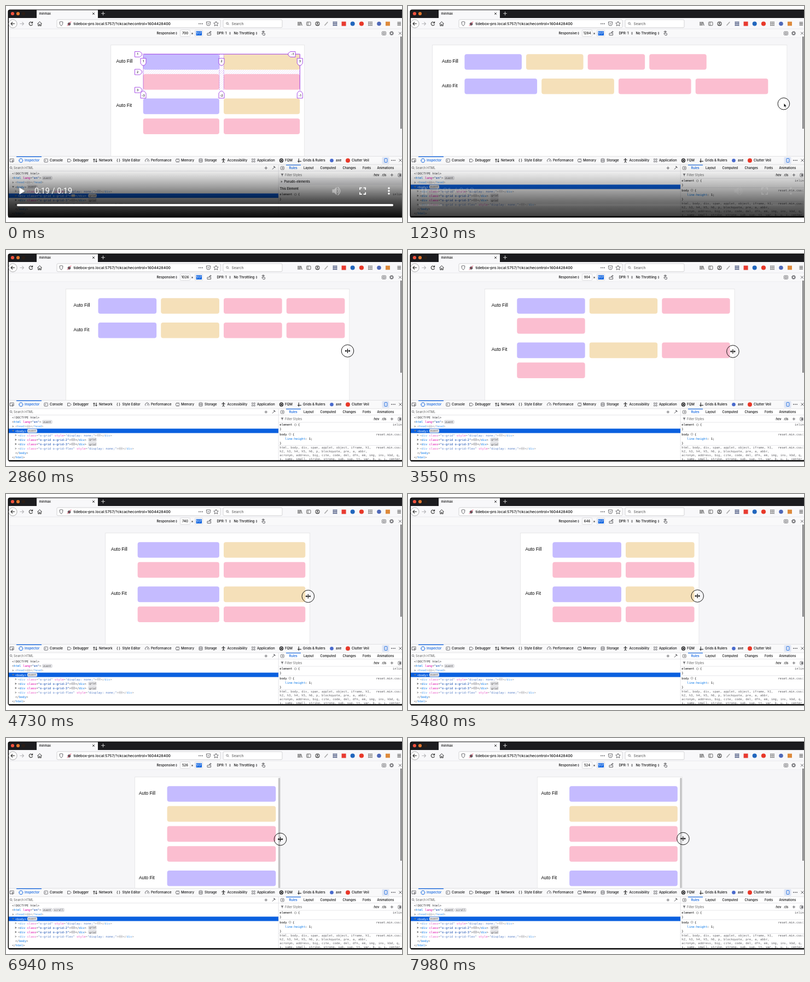
These frames come from a looping animation (724 px wide and 396 px high, 8000 ms). An HTML page:

```html
<!DOCTYPE html>
<html lang="en">
<head>
<meta charset="utf-8">
<title>Auto fill and auto fit</title>
<style>
  html, body { margin: 0; width: 100%; height: 100%; overflow: hidden; background: #fff; }
  svg { display: block; }
  text { font-family: Inter, "Open Sans", sans-serif; font-weight: 500; white-space: pre; }
  .mono { font-family: "DejaVu Sans Mono", monospace; font-weight: 400; }
  .page { font-family: "Liberation Sans", sans-serif; font-weight: 400; }
  .clock { font-family: Roboto, sans-serif; font-weight: 400; }
</style>
</head>
<body>
<svg id="stage" width="724" height="396" viewBox="0 0 724 396"></svg>
<script>
const LOOP = 8000, START = 40;
const INK = '#0c0c0d', GREY = '#57575c', BLUE = '#0a60df', VIOLET = '#9326e0';
const MONO = 5.55, CHAR = MONO * 0.602;

// Drawing helpers; text is centred vertically on y.
const esc = s => s.replace(/&/g, '&amp;').replace(/</g, '&lt;');
const text = (x, y, s, size = 6.05, fill = INK, extra = '') =>
  `<text x="${x}" y="${y + size * 0.36}" font-size="${size}" fill="${fill}" ${extra}>${esc(s)}</text>`;
const mono = (x, y, s, fill = INK, size = MONO) => text(x, y, s, size, fill, 'class="mono"');
const rect = (x, y, w, h, fill, r = 0, extra = '') =>
  `<rect x="${x}" y="${y}" width="${w}" height="${h}" rx="${r}" fill="${fill}" ${extra}/>`;
const box = (x, y, w, h, stroke = GREY, r = 1, fill = 'none') => rect(x, y, w, h, fill, r, `stroke="${stroke}" stroke-width=".8"`);
const dot = (x, y, r, fill, extra = '') => `<circle cx="${x}" cy="${y}" r="${r}" fill="${fill}" ${extra}/>`;
const ring = (x, y, r, stroke = GREY, w = 0.9, extra = '') => dot(x, y, r, 'none', `stroke="${stroke}" stroke-width="${w}" ${extra}`);
const line = (d, stroke = GREY, w = 0.9, extra = '') => `<path d="${d}" fill="none" stroke="${stroke}" stroke-width="${w}" ${extra}/>`;
const shape = (d, fill) => `<path d="${d}" fill="${fill}"/>`;
const cross = (x, y, r = 2.2, stroke = GREY) => line(`M${x - r} ${y - r}l${2 * r} ${2 * r}m0 ${-2 * r}l${-2 * r} ${2 * r}`, stroke);
const plus = (x, y, r = 3, stroke = GREY) => line(`M${x - r} ${y}h${2 * r}M${x} ${y - r}v${2 * r}`, stroke);
const dots = (x, y, fill = GREY) => [-3, 0, 3].map(d => dot(x + d, y, 0.9, fill)).join('');
const updown = (x, y) => shape(`M${x - 1.5} ${y - .6}l1.5 -2.2l1.5 2.2zm0 1.2l1.5 2.2l1.5 -2.2z`, GREY);
const mesh = (x, y, stroke = GREY) => line(`M${x - 4} ${y - 3}h8m-8 3h8m-8 3h8M${x - 3} ${y - 4}v8m3 -8v8m3 -8v8`, stroke, 0.9);
const lens = (x, y) => ring(x, y, 1.8, GREY, 0.7) + line(`M${x + 1.3} ${y + 1.3}l1.8 1.8`, GREY, 0.7);

function browser() {
  return rect(3.5, 6.5, 730, 381, '#050505', 4) + rect(5, 7.5, 719, 15, '#1c1c1f', 3) + rect(5, 22, 719, 363.5, '#f8f8fa')
    // tab strip
    + dot(12, 14, 3.1, '#f4523f') + dot(22, 14, 3.1, '#e2762d') + dot(32, 14, 3.1, '#2a1d16')
    + rect(56, 7.5, 112, 15, '#f8f8fa') + text(60.5, 14.3, 'minmax', 5.7) + cross(160, 14, 1.9, '#222') + plus(177.5, 13.7, 3.4, '#ddd')
    // navigation
    + dot(12.5, 32.5, 7.6, '#fff', 'stroke="#888" stroke-width=".7"')
    + line('M16 32.5h-7m3 -3l-3 3l3 3', '#333', 1.1) + line('M25.5 32.5h7m-3 -3l3 3l-3 3', '#b5b5b8', 1.1)
    + line('M48 30.5a3.2 3.2 0 1 0 .5 3M48.6 28.5v2.6h-2.6', '#333', 1.1)
    + line('M57.5 32.5l4 -3.8l4 3.8M58.8 32v4.3h2v-2.5h1.4v2.5h2v-4.3', '#333', 1)
    + box(93, 25, 299, 14.7, '#c8c8cb', 2, '#fff')
    + line('M98 29.2q2.6 0 3 -1q.4 1 3 1q.3 5.5 -3 7.3q-3.3 -1.8 -3 -7.3z') + dot(115.5, 33, 2.8, '#58585c')
    + line('M112 36.5l7 -8', '#e2385a', 1)
    + text(123.5, 32.5, 'tidebox-pro.local:5757/?ckcachecontrol=1604428400', 6.85) + dots(356, 32.5)
    + line('M366.5 29h7v3.5a3.5 3.5 0 0 1 -7 0zM368.2 31.5l1.8 1.7l1.8 -1.7')
    + line('M384 28.2l1.3 2.8l3 .3l-2.2 2.1l.6 3.1l-2.7 -1.6l-2.7 1.6l.6 -3.1l-2.2 -2.1l3 -.3z')
    + box(397, 25, 108, 14.7, '#c8c8cb', 2, '#fff') + lens(404.5, 31.8) + text(412.5, 32.5, 'Search', 6.5, '#666')
    // extensions
    + line('M534 29v7m2 -7v7m2 -7v7m1.2 -6.7l2 6.7', '#444', 1) + box(549.5, 29.3, 7.5, 6.4, '#444') + line('M552 29.3v6.4', '#444')
    + ring(569.5, 32.5, 3.5, '#444', 1.1) + dot(569.5, 31.6, 1.4, '#444') + line('M567.3 34.6h4.4', '#444', 1)
    + line('M582.5 35.8l5.8 -6.5', '#aaa', 1.7) + mesh(601.5, 32.5, '#334170') + rect(613.6, 28.6, 8, 8, '#e83b31')
    + dot(633.7, 32.5, 4, '#2166bd') + dot(650, 32.5, 4.1, '#e83829') + mesh(666, 32.5, '#777')
    + dot(682, 32.5, 3.8, '#5069b8') + rect(694, 28.7, 8, 7.6, '#dd8a3c')
    + line('M715.5 30h6.5m-6.5 2.5h6.5m-6.5 2.5h6.5', '#333', 1)
    // responsive bar
    + rect(5, 42, 719, 16, '#f9f9fa') + line('M5 42h719M5 58h719', '#dedee1', 0.6)
    + text(275.5, 50, 'Responsive') + updown(311.5, 50) + box(318.5, 44, 18, 11.7, '#d4d4d8', 1, '#fff')
    + text(338.5, 50, '×') + box(345.5, 44, 14, 11.7, '#d4d4d8', 1, '#fff') + rect(347.5, 46, 10.5, 8, BLUE) + text(347.7, 50, '517', 6.05, '#fff')
    + line('M368 50v3.5h6.5v-3.5zM371 48.5h3v-2m-1.5 1.3l1.5 -1.7l1.5 1.7')
    + text(385.5, 50, 'DPR: 1') + updown(409.5, 50) + text(416.5, 50, 'No Throttling') + updown(458, 50)
    + line('M470 53.5l-2.4 -3l1.2 -.6l1 1v-4.4h1.2v3.3l2.6 .8l-.5 2.9zM467.5 47.3q2.8 -3 5.6 0')
    + box(687.5, 47, 7, 6.2) + ring(691, 50.2, 1.6)
    + ring(705, 50, 2.3, GREY, 1.2) + ring(705, 50, 3.6, GREY, 1, 'stroke-dasharray="1.4"')
    + cross(720.5, 50, 2.4)
    + rect(5, 58.3, 719, 217, '#f6f6f8') + rect(721.6, 56, 1.4, 169, '#333');
}

function devtools() {
  const tabs = { Inspector: 34, Console: 80, Debugger: 122.5, Network: 170, 'Style Editor': 212.5, Performance: 265, Memory: 320,
    Storage: 363, Accessibility: 404.5, Application: 459, FQM: 510, 'Grids & Rulers': 543, axe: 603, 'Clutter Veil': 632 };
  const side = { Rules: 517.5, Layout: 544, Computed: 574.5, Changes: 615.5, Fonts: 652, Animations: 678.5 };
  const names = (set, y, size) => Object.entries(set).map(([s, x], i) => text(x, y, s, size, i ? INK : BLUE)).join('');
  return rect(5, 275.5, 719, 110, '#fff') + rect(5, 275.5, 719, 15.5, '#f9f9fa')
    + line('M5 275.5h719M5 291h719', '#d8d8dc', 0.7) + rect(19, 275.7, 46, 1.3, BLUE)
    + names(tabs, 283.2, 6.05)
    + line('M12 285.8h-4.8v-5.5h7v2M11 282.8l4 1.4l-1.9 .7l-.7 1.9z')
    + box(24.3, 280.3, 6, 6, BLUE) + line('M27.3 279v1.3m0 6v1.3m-4.3 -4.3h1.3m6 0h1.3', BLUE)
    + box(69.8, 280.3, 6.6, 6) + line('M71.3 282l1.3 1.3l-1.3 1.3')
    + line('M112.5 280.8h4.3l2.5 2.5l-2.5 2.5h-4.3z')
    + line('M161 286.5v-6m-1.6 1.6l1.6 -1.7l1.6 1.7M165 280v6m-1.6 -1.6l1.6 1.7l1.6 -1.7', INK, 1)
    + text(202, 283, '{ }', 6.2)
    + line('M255 285.5a3.5 3.5 0 1 1 6 0M258 285l1.3 -3') + box(310.5, 281, 6.2, 4.5) + line('M312 279.8v1.2m2 -1.2v1.2m2 -1.2v1.2m-4 4.5v1.2m2 -1.2v1.2m2 -1.2v1.2')
    + box(353, 279.8, 6, 6.8, GREY, 1.5) + line('M353 282h6m-6 2.2h6')
    + dot(397.5, 280.2, 1, INK) + line('M394.3 282h6.4m-3.2 0v2.2l-1.7 3m1.7 -3l1.7 3', INK, 1)
    + [449.3, 453].map(x => box(x, 280, 2.4, 2.4) + box(x, 283.9, 2.4, 2.4)).join('')
    + ring(503.5, 283.2, 3, INK, 1.3) + dot(503.5, 283.2, 1.4, INK) + line('M533 284.7h7m-4.8 -5v7.5', INK, 1)
    + dot(595.5, 283.2, 3.3, '#4869cc') + dot(625, 283.2, 4, '#e83829')
    + rect(687.5, 277, 13, 12.5, '#dfe6f5', 1.5) + box(692, 279.5, 5, 7, BLUE) + dots(708, 283) + cross(721, 283, 2.5)
    // markup search and side tabs
    + line('M5 302.6h719M498.2 291v94.5', '#dcdce0', 0.7)
    + lens(9, 296.3) + text(14, 297, 'Search HTML', 5.55, '#777') + plus(475.3, 297, 2.7) + line('M487 299.5l3.8 -4.2', GREY, 1) + line('M489.5 293.7l2.8 2.8', GREY, 1.5)
    + box(502.3, 294.3, 6, 5.5) + shape('M504 297l2.5 -1.5v3z', GREY) + rect(512, 291, 27, 1.1, BLUE) + names(side, 297, 5.75)
    + shape('M502.5 307.5h5l-2 2.3v2.4l-1 -.7v-1.7z', GREY) + text(510, 309.8, 'Filter Styles', 5.55, '#777')
    + text(671, 309.8, ':hov', 5.55) + text(686, 309.8, '.cls', 5.55) + plus(705.5, 309.8, 2.6) + box(717, 307, 5, 6) + rect(719, 308.5, 3, 3, GREY)
    + line('M498 316h226', '#dcdce0', 0.7);
}

// Markup tree
const rowY = i => 307.2 + i * 8.1;
const badge = (x, y, label, w) => box(x, y - 3, w, 6, '#c9c9cf', 1.4, '#eeeef1') + mono(x + 1.6, y, label, '#333', 4.8);
const fold = (x, y, open) => shape(open ? `M${x - 2} ${y - 1.3}h4l-2 3z` : `M${x - 1.3} ${y - 2}v4l3 -2z`, '#777');
function paint(src, selected) {
  if (selected) return `<tspan fill="#fff">${esc(src)}</tspan>`;
  return src.replace(/("[^"]*")|([a-z]+)(?==)|(<\/?)([a-z]+)|([>=])/g, (m, value, attr, lead, name) =>
    value ? `<tspan fill="#003eaa">${value}</tspan>` : attr ? `<tspan fill="#dd00a9">${attr}</tspan>`
    : name ? `${esc(lead)}<tspan fill="#0074e8">${name}</tspan>` : m);
}
function node(row, x, src, { close, tag, open, chosen, dim } = {}) {
  const y = rowY(row);
  const put = (px, s) => `<text class="mono" x="${px}" y="${y + 2}" font-size="${MONO}" fill="#55555a">${paint(s, chosen)}</text>`;
  let end = x + src.length * CHAR, out = put(x, src);
  if (open !== undefined) out += fold(x - 4, y, open);
  if (close) {
    out += box(end + .7, y - 2, 6.6, 4, '#b5b5bc', 1, '#eeeef1') + [2, 4, 6].map(d => dot(end + d, y, 0.55, '#444')).join('') + put(end + 8, close);
    end += 8 + close.length * CHAR;
  }
  if (tag) out += badge(end + (tag === 'grid' ? 3.8 : 2.2), y, tag, tag.length * 2.9 + 3);
  return `<g opacity="${dim ? 0.65 : 1}">${out}</g>`;
}
function tree(picked) {
  const div = (row, cls, style, tag) => node(row, 22, `<div class="${cls}"${style ? ' style="display: none;"' : ''}>`,
    { close: '</div>', open: false, tag, dim: style, chosen: row === picked });
  return rect(5, rowY(picked) - 4, 493, 8.1, BLUE) + mono(11, rowY(0), '<!DOCTYPE html>', '#38383d')
    + node(1, 11, '<html lang="en">', { tag: 'event' }) + node(2, 17, '<head>', { close: '</head>', open: false, dim: true })
    + node(3, 17, '<body>', { tag: 'event', open: true, chosen: picked === 3 })
    + div(4, 'o-grid', true) + div(5, 'o-grid o-grid-2', false, 'grid') + div(6, 'o-grid o-grid-3', false, 'grid') + div(7, 'o-grid o-grid-flex', true)
    + node(8, 17, '</body>') + node(9, 11, '</html>');
}

// Rules panel
const rule = (y, name) => mono(500.3, y, name) + box(500 + CHAR * (name.length + 1.2), y - 1.7, 3.4, 3.4, '#888') + mono(502 + CHAR * (name.length + 2.6), y, '{');
const elementRules = () => rect(498.6, 316.4, 226, 11.5, '#f3f3f5') + fold(504, 322, false) + text(508.5, 322.2, 'Pseudo-elements', 5.6)
  + text(500.5, 335, 'This Element', 5.6) + rule(345.5, 'element') + mono(707, 345.5, 'inline', GREY) + mono(500.3, 354, '}');
const bodyRules = () => rule(320.5, 'element') + mono(707, 320.5, 'inline', GREY) + mono(500.3, 328.3, '}')
  + rule(337.7, 'body') + mono(676.5, 337.7, 'reset.min.css:2', GREY) + mono(510.3, 346, 'line-height', '#0074e8') + mono(510.3 + 11 * CHAR, 346, ': 1;') + mono(500.3, 354, '}')
  + line('M498 333h226M498 358.4h226', '#dcdce0', 0.7) + mono(676.5, 362.3, 'reset.min.css:2', GREY)
  + ['html, body, div, span, applet, object, iframe, h1,', 'h2, h3, h4, h5, h6, p, blockquote, pre, a, abbr,',
     'acronym, address, big, cite, code, del, dfn, em, img, ins, kbd, q,', 's, samp, small, strike, strong, sub, sup, tt, var, b, u, i, center,']
    .map((s, i) => mono(500.3, 362.3 + i * 6.75, s, '#66666b')).join('');

// Responsive page: two grids of repeat(auto-fill | auto-fit, minmax(200px, 1fr))
const SCALE = 0.5045, CENTRE = 368.7, GAP = 16 * SCALE, ROW = 28.6, TOP = 88.2;
const COLOURS = ['#c5bbff', '#f5e0b9', '#fbbed0', '#fbbed0'];
const rightEdge = w => CENTRE + w * SCALE / 2;
function page(w) {
  const wide = w * SCALE, left = CENTRE - wide / 2, x0 = left + 58.6;
  const room = Math.min(1100 * SCALE, wide - 58.6 - GAP);
  const fill = Math.floor((room + GAP) / (200 * SCALE + GAP)), fit = Math.min(fill, 4);
  const step = ROW + GAP, rows = Math.ceil(4 / fit);
  const grid = (label, cols, top) => {
    const cell = (room + GAP) / cols - GAP;
    return text(left + wide * 0.0265, top + 12.6, label, 8.3, '#000', 'class="page"')
      + COLOURS.map((c, i) => rect(x0 + (i % cols) * (cell + GAP), top + Math.floor(i / cols) * step, cell, ROW, c, 4)).join('');
  };
  return rect(left - .6, 71.2, wide + 1.2, 210, '#dcdcde') + rect(left, 71.8, wide, 210, '#fff')
    + grid('Auto Fill', fill, TOP) + grid('Auto Fit', fit, TOP + rows * step + GAP)
    + (rows > 2 ? rect(left + wide - 3.6, 73, 3.4, 202, '#c3c3c4', 1.5) : '');
}

function gridLines() {
  const xs = [251, 394, 537.3], [t, b] = [88.2, 154];
  const label = (x, y, s, turn) => `<g transform="translate(${x} ${y})"><path transform="rotate(${turn})" d="M-5 -5h10v9l-3.2 4h-3.6l-3.2 -4z" fill="#fff" stroke="${VIOLET}" stroke-width=".8" stroke-linejoin="round"/>${text(0, 0, s, 5.2, INK, 'text-anchor="middle"')}</g>`;
  return rect(251, 117, 286.3, 8, 'url(#hatch)') + rect(390, t, 8.2, b - t, 'url(#hatch)')
    + line(`M251 ${t}H537.3V${b}`, VIOLET, 0.9) + line(`M251 ${t}V${b}`, VIOLET, 0.5)
    + line(`M390 ${t}V${b}M398.2 ${t}V${b}`, VIOLET, 0.5, 'stroke-dasharray="2 1.2"')
    + xs.map((x, i) => label(x, 101, `${i + 1}`, 0) + label(x, 164, `${i - 3}`, 180)).join('')
    + [88.5, 121, 154].map((y, i) => label(240.5, y, `${i + 1}`, -90)).join('') + label(524, 88.5, '-1', 90);
}

function controls(t) {
  const ended = t < START, sec = Math.floor(Math.max(0, t - START) / 1000);
  const done = ended ? 1 : (t - START) / 19000;
  return shape(ended ? 'M24.5 333v12.5l10 -6.2z' : 'M24.5 333.5h3.5v12h-3.5zm6.5 0h3.5v12h-3.5z', '#fff')
    + text(52, 339, `0:${ended ? 19 : '0' + sec} / 0:19`, 14.5, '#fff', 'class="clock"')
    + `<g opacity=".4">${shape('M596.5 336.3h3.5l4.5 -4.5v15l-4.5 -4.5h-3.5z', '#fff')}${line('M606.5 335.5q3 3.7 0 7.4M606.5 332q8.5 7.3 0 14.6', '#fff', 1.6)}</g>`
    + line('M647 337v-3.6h3.6m3 0h3.6v3.6m0 4.4v3.6h-3.6m-3 0h-3.6v-3.6', '#fff', 1.8)
    + [-5, 0, 5].map(d => dot(700, 339 + d, 1.8, '#fff')).join('')
    + rect(20, 363, 688, 4, 'rgba(255,255,255,.3)', 2) + rect(20, 363, 688 * done, 4, '#fff', 2);
}

function cursor(x, y, dragging) {
  return ring(x, y, dragging ? 11.3 : 10.8, '#000', 0.9) + (dragging
    ? line(`M${x - 3.5} ${y}h7M${x} ${y - 4}v8`, '#000', 1.2) + shape(`M${x - 5} ${y}l2.5 -2v4zM${x + 5} ${y}l-2.5 -2v4z`, '#000')
    : `<path d="M${x + .5} ${y - .5}v6.3l1.5 -1.3l1.2 2.3l1 -.5l-1.1 -2.2h1.9z" fill="#000" stroke="#fff" stroke-width=".3"/>`);
}

// Keys are [time, value...] rows.
function track(keys, t, col = 1) {
  const i = keys.findIndex(k => k[0] > t);
  if (i < 0) return keys[keys.length - 1][col];
  if (!i) return keys[0][col];
  const a = keys[i - 1], b = keys[i];
  return a[col] + (b[col] - a[col]) * (t - a[0]) / (b[0] - a[0]);
}
const WIDTHS = [[1800, 1284], [2150, 1262], [2500, 1190], [2680, 1105], [2860, 1026], [3100, 970], [3320, 933], [3550, 904], [4150, 830],
  [4730, 740], [4960, 727], [5400, 660], [5800, 588], [6220, 544], [6800, 527], [7400, 522], [7980, 524]];
// Pointer height and its distance from the page's right edge.
const POINTER = [[1230, 179.2, -5.7], [1750, 184, -3], [2860, 185, -3], [3550, 186, -2.8], [4730, 187.5, -3], [6220, 186.5, -2], [7400, 185, 1.5], [7980, 184.5, 2]];
const CONTROLS_FADE = [[840, 1], [1310, 0]], SHADE_FADE = [[1130, 1], [1630, 0]];

const stage = document.getElementById('stage');
stage.innerHTML = `<defs>
  <linearGradient id="dusk" x2="0" y2="1"><stop stop-opacity="0"/><stop offset=".2" stop-opacity=".1"/><stop offset=".45" stop-opacity=".37"/><stop offset=".7" stop-opacity=".69"/><stop offset="1" stop-opacity=".96"/></linearGradient>
  <pattern id="hatch" width="4" height="4" patternUnits="userSpaceOnUse"><path d="M0 4L4 0" stroke="${VIOLET}" stroke-width=".5" opacity=".28"/></pattern>
  <clipPath id="view"><path d="M5 58.5h716.6v217h-716.6z"/></clipPath></defs>
  ${browser()}<g id="page" clip-path="url(#view)"></g><g id="lines">${gridLines()}</g>${devtools()}
  <g id="before">${tree(5)}${elementRules()}</g><g id="after">${tree(3)}${bodyRules()}</g>
  <g id="scroll">${badge(86.2, rowY(1), 'scroll', 20)}</g>
  ${rect(5, 385.3, 719, 2.2, '#050505')}<g id="size"></g><g id="pointer"></g>
  <g id="shade">${rect(4, 285, 720, 102.5, 'url(#dusk)')}</g><g id="controls"></g>`;
const part = id => document.getElementById(id);
const show = (id, on) => part(id).setAttribute('visibility', on ? 'visible' : 'hidden');

function draw(t) {
  const intro = t < START;
  const w = intro ? 700 : 2 * Math.round(track(WIDTHS, t) / 2);
  show('lines', intro);
  show('before', intro);
  show('after', !intro);
  show('scroll', t > 6700);
  part('page').innerHTML = page(w);
  part('size').innerHTML = text(327.5, 50, String(w), 6.05, INK, 'text-anchor="middle"');
  part('pointer').innerHTML = intro ? '' : cursor(rightEdge(w) + track(POINTER, t, 2), track(POINTER, t), t > 1700);
  part('shade').setAttribute('opacity', track(SHADE_FADE, t));
  part('controls').setAttribute('opacity', track(CONTROLS_FADE, t));
  part('controls').innerHTML = controls(t);
}

const origin = performance.now();
function tick() {
  draw((performance.now() - origin) % LOOP);
  requestAnimationFrame(tick);
}
draw(0);
requestAnimationFrame(tick);
</script>
</body>
</html>
```
